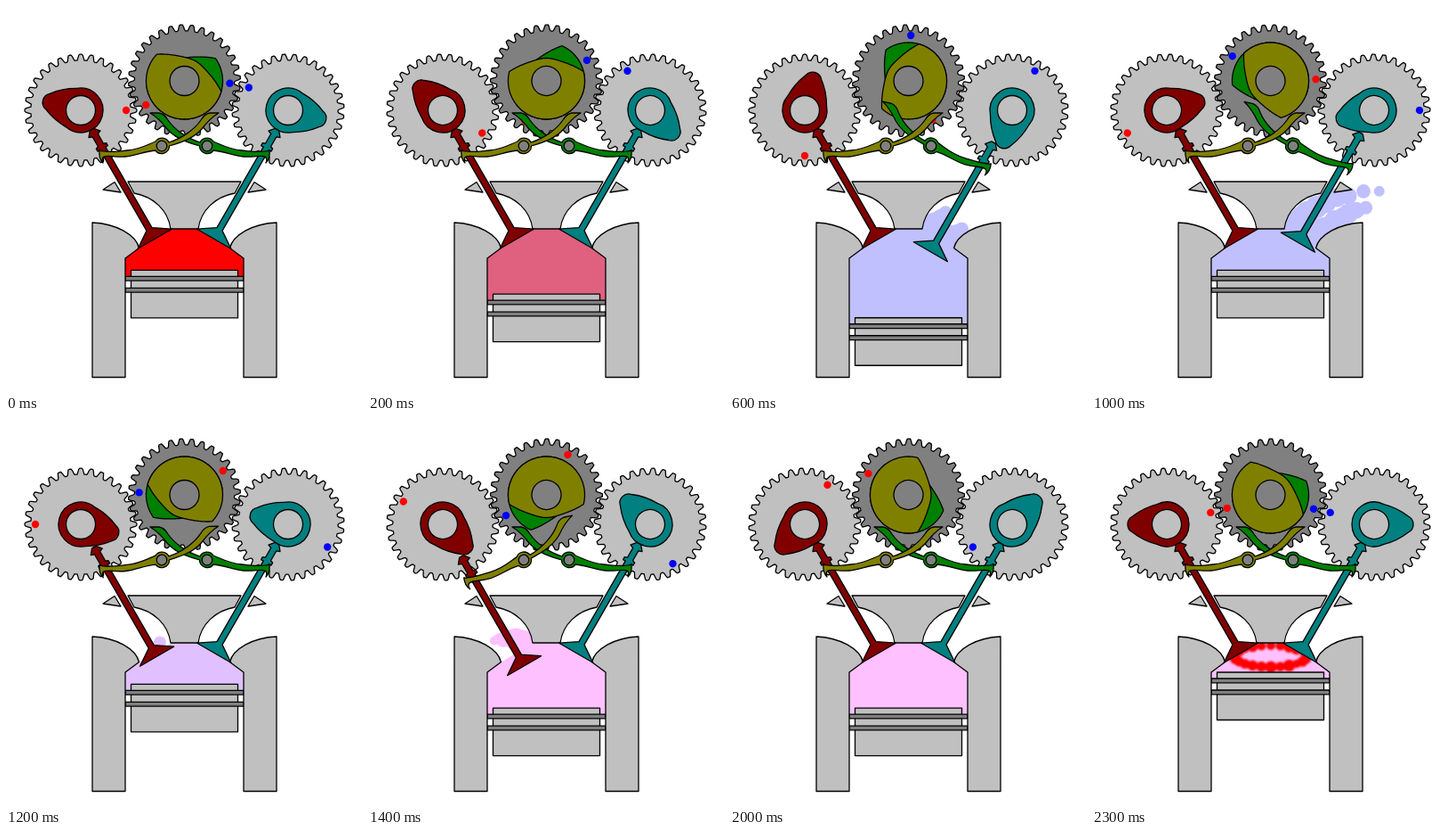
Write an HTML page that moves like this. It is 400 px wide and 433 px high and loops after 2400 ms.

```html
<!DOCTYPE html>
<html lang="en">
<head>
<meta charset="utf-8">
<title>Desmodromic valve engine</title>
<style>
  html, body { margin: 0; width: 100%; height: 100%; overflow: hidden; background: #fff; }
  svg { display: block; width: 400px; height: 433px; }
  .ink { stroke: #000; stroke-width: 1.3; stroke-linejoin: round; }
  .light { fill: #c0c0c0; }
  .dark { fill: #808080; }
</style>
</head>
<body>
<svg viewBox="0 0 400 433">
  <defs>
    <g id="casting" class="ink light">
      <path d="M97 243C124 244 146 257 149.500 271.500L134 283V416.500H97Z"/>
      <path d="M109 206L122 197.500L129 209Z"/>
    </g>
    <path id="valve" class="ink"/>
    <g id="rocker" class="ink">
      <path d="M168 152A8.600 8.600 0 0 1 183 153C199 148 212 138 219 128Q223 121 229 120H239Q229 126 220 138C210 149 197 153 183.500 157A8.600 8.600 0 0 1 168 162C155 163 146 168 134 169C122 170 115 167 110 169Q107 171 109 176Q104 171 105 162C113 165 125 163 136 162C150 161 158 156 168 152Z"/>
      <circle class="dark" cx="175" cy="157" r="5.800"/>
    </g>
    <clipPath id="room"><path id="roomShape"/></clipPath>
    <filter id="soft"><feGaussianBlur stdDeviation="1"/></filter>
  </defs>

  <g id="gas"><path id="charge"/></g>
  <g clip-path="url(#room)"><g id="flame" fill="red" filter="url(#soft)"></g></g>

  <g id="piston" class="ink">
    <rect class="light" x="140.500" width="120" height="53.500"/>
    <rect class="dark" x="134" y="7" width="133" height="4.800"/>
    <rect class="dark" x="134" y="20" width="133" height="4.800"/>
  </g>
  <use href="#casting"/>
  <use href="#casting" transform="translate(401 0) scale(-1 1)"/>
  <path class="ink light" d="M137 197H264L257 210C235 214 219 229 216 250H185C182 229 166 214 144 210Z"/>

  <g id="gears"></g>

  <use id="valveL" href="#valve" fill="#800000"/>
  <g transform="translate(401 0) scale(-1 1)">
    <use id="valveR" href="#valve" fill="#008080"/>
    <use id="rockerR" href="#rocker" fill="#008000"/>
  </g>
  <use id="rockerL" href="#rocker" fill="#808000"/>
</svg>

<script>
const $ = id => document.getElementById(id);
const STEPS = 24, STEP_MS = 100, TURN = 360 / STEPS, TEETH = 32;

function add(parent, tag, attrs) {
  const el = document.createElementNS('http://www.w3.org/2000/svg', tag);
  for (const key in attrs) el.setAttribute(key, attrs[key]);
  return parent.appendChild(el);
}

let seed = 7;
function random() {
  seed = (seed * 16807) % 2147483647;
  return seed / 2147483647;
}

const rad = deg => deg * Math.PI / 180;
const clamp = (v, lo, hi) => Math.min(hi, Math.max(lo, v));
const point = (r, deg) => [r * Math.cos(rad(deg)), r * Math.sin(rad(deg))];
const polygon = points => 'M' + points.map(p => p.map(v => v.toFixed(2))).join('L') + 'Z';

// Closed outline whose radius depends on the angle.
function outline(radius) {
  const points = [];
  for (let a = 0; a < 360; a++) points.push(point(radius(a), a));
  return polygon(points);
}

const gearPath = phase =>
  outline(a => 59.5 + 3.4 * clamp(1.6 * Math.cos(rad(TEETH * (a - phase))), -1, 1));

// Opening cam: a base circle and a small nose circle joined by bulging flanks.
function lobePath(axis) {
  const base = 25, nose = 10, reach = 34;
  const a = Math.acos((base - nose) / reach) * 180 / Math.PI;
  const [bx, by] = point(base, a), [nx, ny] = point(nose, a), tip = reach + nx;
  return {
    d: `M${bx} ${by}A${base} ${base} 0 1 1 ${bx} ${-by}A75 75 0 0 1 ${tip} ${-ny}` +
       `A${nose} ${nose} 0 0 1 ${tip} ${ny}A75 75 0 0 1 ${bx} ${by}Z`,
    transform: `rotate(${axis})`
  };
}

// 1 at the centre of a dwell, falling steeply to 0 at its ends.
const dwell = (d, half) => Math.max(0, 1 - Math.abs(d / half) ** 3);

// Closing cam: a large disc with one flattened side.
const closerPath = axis => ({
  d: outline(a => 43 - 17.5 * dwell((a - axis + 540) % 360 - 180, 76))
});

function makeGear(x, y, shade, phase, dir, dots, cams) {
  const spot = add($('gears'), 'g', { transform: `translate(${x} ${y})` });
  const wheel = add(spot, 'g', {});
  add(wheel, 'path', { class: 'ink ' + shade, d: gearPath(phase) });
  for (const [angle, fill] of dots) {
    const [cx, cy] = point(51, angle);
    add(wheel, 'circle', { cx, cy, r: 4.2, fill });
  }
  for (const [shape, fill] of cams) add(wheel, 'path', { class: 'ink', fill, ...shape });
  add(wheel, 'circle', { class: 'ink ' + shade, r: 16.5 });
  return { wheel, dir };
}

const gears = [
  makeGear(84, 117, 'light', 0, 1, [[0, 'red']], [[lobePath(195), '#800000']]),
  makeGear(317, 117, 'light', 63, 1, [[210, 'blue']], [[lobePath(15), '#008080']]),
  makeGear(200.5, 84, 'dark', 154.1, -1, [[148, 'red'], [3, 'blue']],
    [[closerPath(248), '#008000'], [closerPath(300), '#808000']])
];

// Valve outline: half of the profile along the stem, mirrored.
const half = [[25, 2.5], [31, 7.5], [32.5, 3.5], [45, 3.5], [46, 6.5], [49.5, 6.5], [49.5, 3.5], [154, 3.5], [166.5, 22]];
$('valve').setAttribute('d', polygon([...half, ...half.map(([u, v]) => [u, -v]).reverse()]));

// A row of puffs along a curve, each appearing as the front passes it.
function stream([a, b, c], r0, r1, from, spread, to) {
  const count = 10;
  return Array.from({ length: count }, (_, i) => {
    const f = i / (count - 1);
    const along = k => (1 - f) ** 2 * a[k] + 2 * f * (1 - f) * b[k] + f * f * c[k] + 4 * (random() - 0.5);
    const r = r0 + (r1 - r0) * f;
    return { el: add($('gas'), 'circle', { cx: along(0), cy: along(1) }), r, from: from + spread * f, to };
  });
}

const puffs = [
  ...stream([[228, 254], [238, 214], [322, 208]], 16, 8, 4, 5, 10),
  ...stream([[242, 262], [266, 244], [306, 226]], 15, 10, 4, 5, 10),
  ...stream([[172, 248], [155, 244], [142, 248]], 14, 9, 12, 2, 18)
];

// Ring of burning blobs.
for (let a = 0; a < 360; a += 15) {
  const [x, y] = point(1, a);
  add($('flame'), 'circle', { cx: 201 + 41 * x, cy: 265 + 12 * y, r: 4 + 3 * random() });
}

const RED = [255, 0, 0], LILAC = [192, 192, 255], PINK = [255, 192, 255];

function mix(a, b, f) {
  f = clamp(f, 0, 1);
  return `rgb(${a.map((v, i) => Math.round(v + (b[i] - v) * f))})`;
}

function lift(d) {
  return Math.abs(d) < 67 ? 9.5 * (1 + Math.cos(Math.PI * d / 67)) : 0;
}

// The rocker trails its valve by a few degrees.
function moveValve(side, d) {
  $('valve' + side).setAttribute('transform', `translate(84 117) rotate(60) translate(${lift(d)} 0)`);
  $('rocker' + side).setAttribute('transform', `rotate(${-14 * dwell(d - 14, 60)} 175 157)`);
}

function draw(n) {
  const angle = n * TURN;
  for (const { wheel, dir } of gears) wheel.setAttribute('transform', `rotate(${dir * angle})`);
  moveValve('L', angle - 225);
  moveValve('R', angle - 105);

  const k = (n + 1) % 12;
  const top = 283 + 13.35 * Math.min(k, 12 - k);
  $('piston').setAttribute('transform', `translate(0 ${top})`);

  const room = `M134 283L149.500 271.500L186 250H215L251.500 271.500L267 283V${top + 8}H134Z`;
  $('charge').setAttribute('d', room);
  $('roomShape').setAttribute('d', room);
  $('gas').setAttribute('fill', n < 11 ? mix(RED, LILAC, n / 4) : mix(LILAC, PINK, (n - 11) / 2));
  for (const { el, r, from, to } of puffs)
    el.setAttribute('r', n >= from && n <= to ? r * Math.min(1, (n - from + 2) / 4) : 0);
  $('flame').setAttribute('visibility', n === STEPS - 1 ? 'visible' : 'hidden');
}

const start = performance.now();
function tick() {
  const t = Math.max(0, performance.now() - start);
  draw(Math.floor(t / STEP_MS) % STEPS);
  requestAnimationFrame(tick);
}
tick();
</script>
</body>
</html>
```
